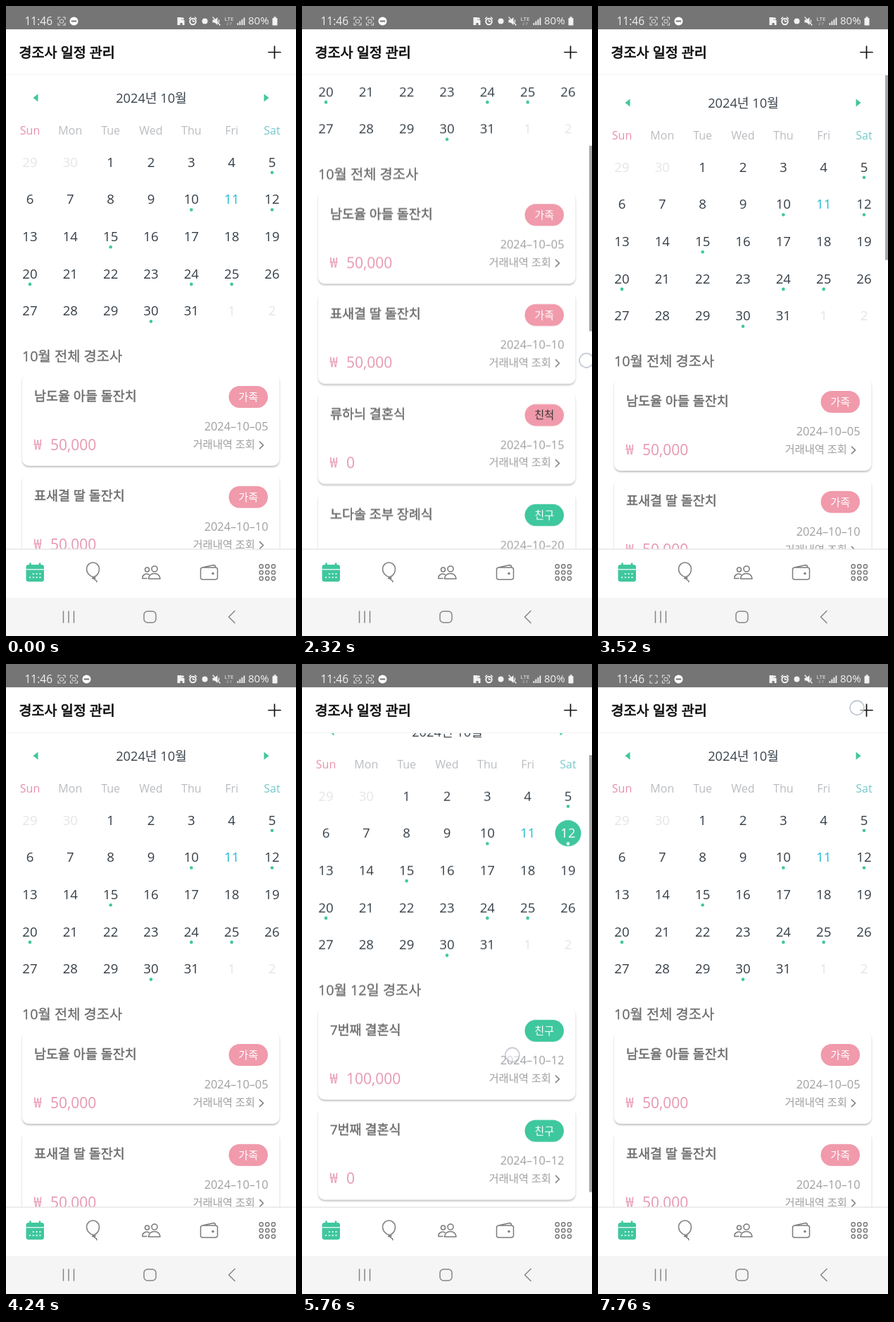
Animation, 412 px wide and 892 px high, one loop 7.84 s. Source, as an HTML page:

```html
<!DOCTYPE html>
<html lang="ko">
<head>
<meta charset="utf-8">
<title>경조사 일정 관리</title>
<style>
  html, body { margin: 0; width: 100%; height: 100%; overflow: hidden; background: #fff; }
  svg { display: block; width: 412px; height: 892px; }
  text { font-family: "Open Sans", "Noto Sans", "Noto Sans CJK KR", "Noto Sans CJK JP", "Noto Sans CJK", sans-serif; }
  .won { font-family: "Noto Sans CJK KR", "Noto Sans CJK JP", "Noto Sans CJK", sans-serif; }
  .line { fill: none; stroke-linecap: round; stroke-linejoin: round; }
  .card { fill: #fff; filter: drop-shadow(0 2px .8px rgba(0, 0, 0, .24)); }
</style>
</head>
<body>
<svg id="stage" viewBox="0 0 412 892" xmlns="http://www.w3.org/2000/svg"></svg>
<script>
const LOOP = 7840;
const GREEN = '#3fc79e', PINK = '#f09aab', BLUE = '#7ccfe8';
const VIEW_TOP = 97, VIEW_HEIGHT = 672, CARD_PITCH = 141.7;
const ALL_HEIGHT = 1719, DAY_HEIGHT = 729.5;

// y is the optical middle of the text.
function text(x, y, str, size, fill, { anchor = 'start', extra = 0, cls = '' } = {}) {
  const outline = extra ? ` stroke="${fill}" stroke-width="${extra}"` : '';
  return `<text class="${cls}" x="${x}" y="${y + size * .365}" font-size="${size}"
    fill="${fill}" text-anchor="${anchor}"${outline}>${str}</text>`;
}
const line = (d, color, width = 1.6) =>
  `<path class="line" d="${d}" stroke="${color}" stroke-width="${width}"/>`;
const dot = (x, y, r, fill) => `<circle cx="${x}" cy="${y}" r="${r}" fill="${fill}"/>`;
const ring = (x, y, r, color, width = 1.6) =>
  `<circle class="line" cx="${x}" cy="${y}" r="${r}" stroke="${color}" stroke-width="${width}"/>`;
const rect = (x, y, w, h, fill, rx = 0, more = '') =>
  `<rect x="${x}" y="${y}" width="${w}" height="${h}" rx="${rx}" fill="${fill}" ${more}/>`;

// Calendar
const columnX = c => 34 + 57.33 * c;
const rowY = r => 220.8 + 52.7 * r;

function calendar() {
  const mid = { anchor: 'middle' };
  const marked = [5, 10, 12, 15, 20, 24, 25, 30];
  let out = text(206.5, 130.5, '2024년 10월', 18.2, '#39424b', mid);
  out += `<path d="M38.5 130l7-5.5v11zM373.5 130l-7-5.5v11z" fill="${GREEN}"/>`;
  ['Sun', 'Mon', 'Tue', 'Wed', 'Thu', 'Fri', 'Sat'].forEach((name, c) => {
    const color = c === 0 ? '#e88fa9' : c === 6 ? '#74c8cc' : '#b9bcc0';
    out += text(columnX(c), 176.5, name, 16, color, mid);
  });
  for (let i = 0; i < 35; i++) {
    const n = i - 1;
    const inside = n >= 1 && n <= 31;
    const label = n < 1 ? n + 30 : n > 31 ? n - 31 : n;
    const color = !inside ? '#e3e5e7' : n === 11 ? '#20bcd2' : '#343d46';
    const x = columnX(i % 7), y = rowY(Math.floor(i / 7));
    out += text(x, y, label, 18.6, color, mid);
    if (marked.includes(n)) out += dot(x, y + 15, 2.3, GREEN);
  }
  const x = columnX(6), y = rowY(1);
  out += `<g id="picked">${dot(x, y + .3, 18.5, GREEN)}${text(x, y, 12, 18.6, '#fff', mid)}${dot(x, y + 15, 2.3, '#fff')}</g>`;
  return out;
}

// Event lists
function card([title, amount, date, tag, tagColor, tagText = '#fff'], i) {
  const gray = '#9f9f9f', rose = '#e797af';
  return `<g transform="translate(0 ${i * CARD_PITCH})">
    <rect class="card" x="23" y="520.5" width="365.5" height="130.5" rx="9"/>
    ${text(40, 552, title, 18.5, '#6c6c6c', { extra: .45 })}
    ${rect(316.5, 538, 55.5, 31, tagColor, 15.5)}
    ${text(344.3, 553.5, tag, 15.2, tagText, { anchor: 'middle' })}
    ${text(372.5, 595.5, '2024–10–' + date, 16.3, gray, { anchor: 'end' })}
    ${text(39.5, 620.5, '₩', 20, rose, { cls: 'won' })}${text(63, 621, amount, 21, rose)}
    ${text(265.5, 620.5, '거래내역 조회', 15.3, gray)}
    ${line('M360.5 617l5 4.8-5 4.8', '#858585', 1.7)}
  </g>`;
}

const wedding = amount => ['7번째 결혼식', amount, '12', '친구', GREEN];
const allEvents = [
  ['남도율 아들 돌잔치', '50,000', '05', '가족', PINK],
  ['표새결 딸 돌잔치', '50,000', '10', '가족', PINK],
  ['류하늬 결혼식', '0', '15', '친척', PINK, '#333'],
  ['노다솔 조부 장례식', '50,000', '20', '친구', GREEN],
  ['탁은별 딸 돌잔치', '0', '25', '친구', GREEN],
  ['마겨울 생일', '0', '30', '지인', BLUE],
  wedding('100,000'),
  wedding('0'),
  ['7번째 결혼식', '0', '24', '친구', GREEN],
];
const dayEvents = [wedding('100,000'), wedding('0')];
const list = (id, heading, events) => `<g id="${id}">
  ${text(23, 496, heading, 19.8, '#6c6c6c', { extra: .3 })}${events.map(card).join('')}</g>`;

// Fixed bars
function scanIcon(x, id) {
  return line(`M${x - 5} 19v-3h3M${x + 2} 16h3v3M${x + 5} 24v3h-3M${x - 2} 27h-3v-3`, '#e4e4e4', 1.1)
    + `<g id="${id}">${rect(x - 2.5, 19.5, 5, 4.5, 'none', 1, 'stroke="#e4e4e4"')}</g>`;
}
const minusIcon = x => dot(x, 21.5, 6, '#fff') + line(`M${x - 3} 21.5h6`, '#757575', 1.8);

function statusBar() {
  const w = '#f2f2f2';
  let out = rect(0, 0, 412, 33, '#757575') + text(26.5, 21, '11:46', 15.5, w);
  out += scanIcon(79, 'scan');
  out += `<g id="early">${minusIcon(96.5)}</g><g id="late">${scanIcon(96.5, 'scan2')}${minusIcon(114.5)}</g>`;
  out += `<path d="M243.5 27V16h6v4h4v7h-3v-3h-3v3z" fill="${w}"/>` + dot(251, 18, 1.8, w);
  out += ring(265.5, 22, 4.2, w, 2) + line('M260.5 18l2-2M270.5 18l-2-2M265.5 20v2h2', w, 1.5);
  out += dot(282.5, 21.5, 4, w);
  out += `<path d="M293.5 19.5h3l4-3.5v11l-4-3.5h-3z" fill="${w}"/>` + line('M294 16l10 11M302.5 20v3', w, 1.3);
  out += text(317, 18.5, 'LTE', 8, w, { anchor: 'middle' });
  out += line('M315 23v4l-1.5-1.5M319 27v-4l1.5 1.5', '#aaa', 1);
  for (let i = 0; i < 4; i++) out += rect(328.5 + i * 3, 24 - i * 2.5, 1.8, 3 + i * 2.5, w);
  out += text(344, 21, '80%', 15, w);
  return out + rect(378.5, 17, 7, 10.5, w, 1.2) + rect(380.5, 15.3, 3, 2, w);
}

function header() {
  return rect(0, 33, 412, 64, '#fff') + rect(0, 96.5, 412, 1.5, '#f6f6f6')
    + text(18.5, 66, '경조사 일정 관리', 19.6, '#111', { extra: .75 })
    + line('M373 65.5h17M381.5 57v17', '#111', 1.7);
}

function tabBar() {
  const g = '#7c7c7c';
  let out = rect(0, 769, 412, 69, '#fff') + rect(0, 768.5, 412, 1.3, '#e4e4e4');
  out += rect(28.5, 791, 25.5, 24, GREEN, 3.5) + line('M34.5 789.5v3M48 789.5v3', GREEN, 2.6);
  out += rect(28.5, 797.2, 25.5, 1.2, '#fff');
  for (let i = 0; i < 7; i++) {
    const c = i < 3 ? i + 1 : i - 3;
    out += dot(34 + c * 4.8, i < 3 ? 804 : 809, 1.1, '#fff');
  }
  // Balloon
  out += line('M124.5 808.500c-5-.5-10-5.500-10-11.500a9 9 0 0 1 18 0c0 5-3 10.500-8 11.500zM124.500 808.500l-2 2 4.500-.5-2.500-1.500M125 810.500c0 3 4 1 4 5', g, 1.5);
  // People
  out += ring(211, 797, 4, g) + line('M202.5 811c0-10 16.5-10 16.5 0z', g);
  out += ring(200.5, 798, 3, g) + line('M200 810.5h-6c-1-5 5-8 9-5.5', g);
  // Wallet
  out += line('M279 795h18.5a3 3 0 0 1 3 3v11a3 3 0 0 1-3 3h-18.5a2.500 2.500 0 0 1-2.500-3v-11a3 3 0 0 1 2.500-3l16-3.500q2.500 0 2.500 3', g, 1.5) + dot(294, 803.5, 1.7, g);
  for (let i = 0; i < 9; i++) out += ring(362.7 + i % 3 * 8.6, 793.4 + Math.floor(i / 3) * 8.6, 2.6, g, 1.5);
  out += rect(0, 838, 412, 54, '#f5f5f5');
  return out + line('M81.5 857v16M89 857v16M96.5 857v16M325 856.5l-8.5 8.5 8.5 8.5', '#858585', 1.5)
    + rect(196, 857, 17, 16, 'none', 5, 'stroke="#858585" stroke-width="1.5"');
}

// The bar slides as a group while its rectangle fades.
const scrollBar = (id, content) => `<g id="${id}">
  ${rect(408, VIEW_TOP, 4, VIEW_HEIGHT ** 2 / content, '#a9a9a9', 0, `id="${id}Fade"`)}</g>`;

document.getElementById('stage').innerHTML = `
  <defs><clipPath id="view">${rect(0, VIEW_TOP, 412, VIEW_HEIGHT, '#000')}</clipPath></defs>
  ${rect(0, 0, 412, 892, '#fff')}
  <g clip-path="url(#view)">
    <g id="scroll">${calendar()}${list('all', '10월 전체 경조사', allEvents)}${list('day', '10월 12일 경조사', dayEvents)}</g>
    ${scrollBar('barAll', ALL_HEIGHT)}${scrollBar('barDay', DAY_HEIGHT)}
  </g>
  ${header()}${tabBar()}${statusBar()}
  <g id="touchMove"><g id="touch">
    <circle r="10" fill="#fff" fill-opacity=".55" stroke="#a3adbb" stroke-opacity=".8" stroke-width="1.3"/>
  </g></g>`;

// Motion: each point is [ms, value].
let rules = '';
function track(id, prop, points, css = v => v, timing = 'linear') {
  const full = [[0, points[0][1]], ...points, [LOOP, points[points.length - 1][1]]];
  const name = id + '-' + prop;
  const frames = full.map(([t, v]) => `${(t / LOOP * 100).toFixed(4)}%{${prop}:${css(v)}}`).join('');
  rules += `@keyframes ${name}{${frames}}#${id}{animation:${name} ${LOOP}ms ${timing} infinite}`;
}
const shown = (id, spans) => track(id, 'opacity',
  [[0, 0], ...spans.flatMap(([from, to]) => [[from, 1], [to, 0]])], v => v, 'step-end');
const moveY = v => `translateY(${v.toFixed(2)}px)`;

const allScroll = [[2060, 0], [2160, 62], [2240, 150], [2320, 256], [2400, 395], [2560, 720],
  [2720, 1000], [2800, 1047], [2860, 1030], [2960, 801], [3120, 420], [3280, 130],
  [3360, 30], [3440, -9], [3520, -7], [3680, 0]];
const dayScroll = [[5200, 0], [5280, 10], [5440, 57], [5680, 57], [5840, 12], [5920, 0]];
track('scroll', 'transform', [...allScroll, ...dayScroll], v => moveY(-v));

function slideBar(id, points, content, [start, hold, end]) {
  const offsets = points.map(([t, v]) => [t, Math.max(0, v) * VIEW_HEIGHT / content]);
  track(id, 'transform', offsets, moveY);
  track(id + 'Fade', 'opacity', [[start, 0], [start + 20, 1], [hold, 1], [end, 0]]);
}
slideBar('barAll', allScroll, ALL_HEIGHT, [2060, 3590, 3760]);
slideBar('barDay', dayScroll, DAY_HEIGHT, [5210, 6300, 6560]);

const pickAt = 4640, clearAt = 6880;
shown('picked', [[pickAt, clearAt]]);
shown('day', [[pickAt, clearAt]]);
shown('all', [[0, pickAt], [clearAt, LOOP]]);
shown('early', [[0, 320]]);
shown('late', [[320, LOOP]]);
shown('scan', [[0, 2800], [3120, 7600]]);

shown('touch', [[2000, 2440], [2870, 3130], [4560, 4800], [5200, 5880], [6780, 6980], [7600, LOOP]]);
track('touchMove', 'transform', [
  [2000, [398, 755]], [2060, [398, 750]], [2320, [404, 503]], [2440, [412, 350]],
  [2870, [410, 150]], [2960, [421, 375]], [3130, [408, 640]],
  [4200, [380, 277]], [4820, [380, 277]],
  [5200, [296, 597]], [5280, [296, 585]], [5440, [298, 500]], [5600, [300, 470]], [5880, [298, 615]],
  [6700, [389, 276]], [7000, [389, 276]],
  [7590, [368, 62]],
], ([x, y]) => `translate(${x}px,${y}px)`);
document.head.appendChild(document.createElement('style')).textContent = rules;
</script>
</body>
</html>
```
